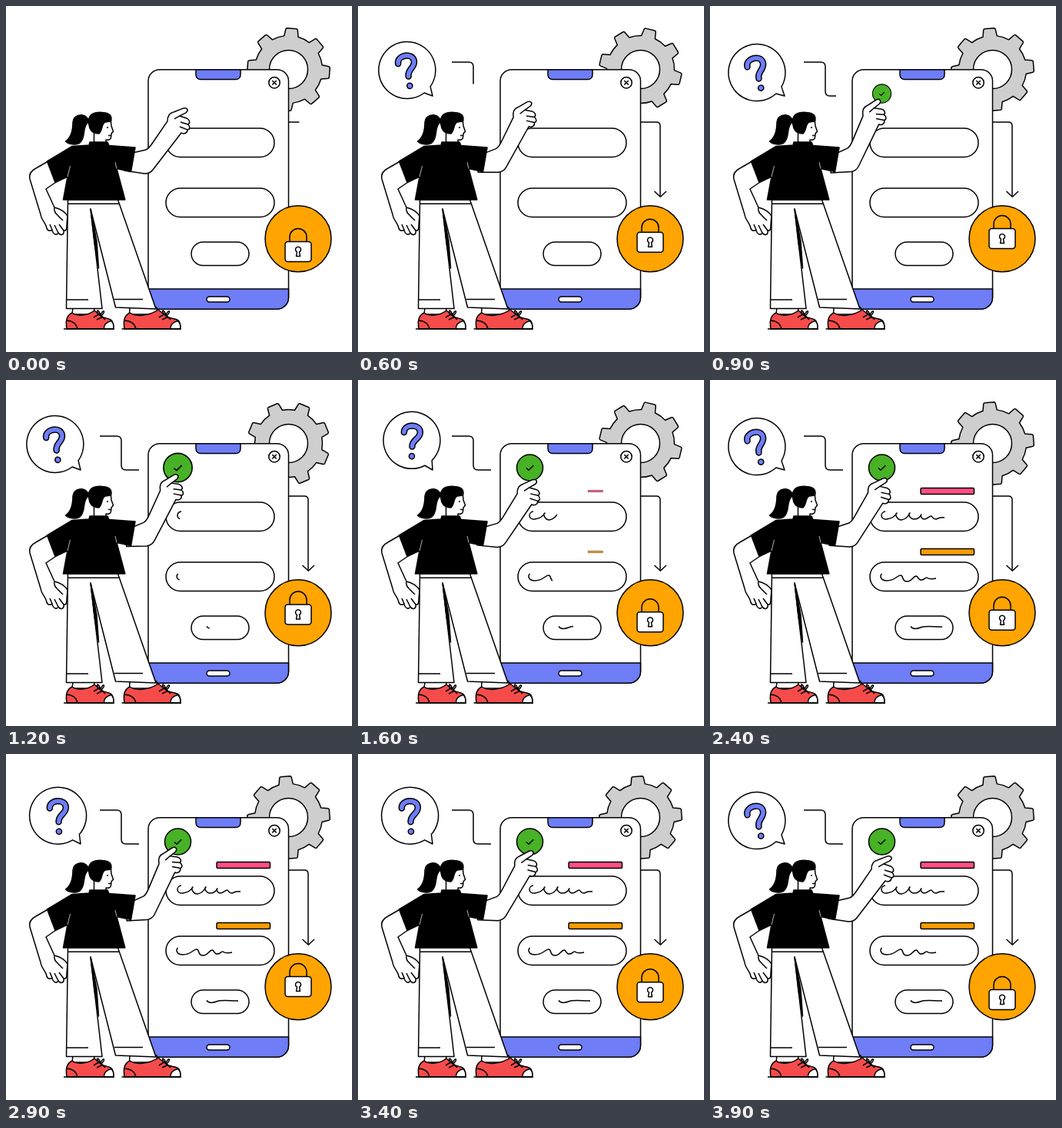
An HTML page that plays this animation: 450 px wide and 450 px high, repeating every 4000 ms.

```html
<!DOCTYPE html>
<html lang="en">
<head>
<meta charset="utf-8">
<title>Login help</title>
<style>
  html, body { margin: 0; height: 100%; overflow: hidden; background: #fff; }
  svg { display: block; width: 100vw; height: 100vh; }
  .ink { fill: none; stroke: #000; stroke-width: 1.5; stroke-linejoin: round; }
  .white { fill: #fff; }
  .blue { fill: #6f7df7; }
  .orange { fill: #ffa400; }
  .red { fill: #f64b4b; }
  .solid { fill: #000; }
</style>
</head>
<body>
<svg viewBox="0 0 450 450">
  <g class="ink">
    <path id="gear" fill="#cecece"/>
    <circle class="white" cx="367.500" cy="82.500" r="25"/>

    <path id="arrow" d="M368 151H388Q393 151 393 156V248" pathLength="1"/>
    <path id="arrowHead" d="M385.500 241L393.300 248.300L401 241"/>
    <path id="link" d="M122 73H144Q150 73 150 79V111Q150 117 156 117H173" pathLength="1"/>

    <!-- phone -->
    <rect class="white" x="185" y="82.700" width="182.500" height="311.500" rx="15"/>
    <path class="blue" d="M185 368H367.500V379.200A15 15 0 0 1 352.500 394.200H200A15 15 0 0 1 185 379.200Z"/>
    <path class="blue" d="M247 82.700H305V89Q305 95.500 298.500 95.500H253.500Q247 95.500 247 89Z"/>
    <rect class="white" x="261" y="378" width="30" height="7" rx="3.500"/>
    <circle cx="349" cy="99.700" r="7.200"/>
    <path d="M346.300 97L351.700 102.400M351.700 97L346.300 102.400"/>
    <rect class="white" x="208" y="159" width="141" height="37.500" rx="18.750"/>
    <rect class="white" x="208" y="237" width="141" height="37.500" rx="18.750"/>
    <rect class="white" x="241" y="307" width="75" height="30.500" rx="15.250"/>
    <g id="bars">
      <rect x="274" y="140.500" width="69.500" height="8" rx="1.500" fill="#ff4f82"/>
      <rect x="274" y="219.500" width="69.500" height="8" rx="1.500" fill="#f99d00"/>
    </g>
    <g id="writing">
      <path pathLength="1" d="M228 171C221 172 221 182 230 181C236 180 241 177 243 173C240 174 243 182 249 182C255 181 258 177 260 173C257 174 260 181 266 181C271 181 273 178 275 175C273 176 275 181 279 181C283 181 286 176 288 177C290 179 290 181 294 181Q300 178 305 179"/>
      <path pathLength="1" d="M223.500 252C220 256 223 261 230 261C241 261 243 254 248 254C252 254 249 262 256 262C263 262 263 256 268 255C271 255 270 260 275 260C279 260 279 257 282 257Q286 260 294 258"/>
      <path pathLength="1" d="M261 320.500C264 324.500 269 324 275 321.500C282 319.500 290 321 302 321"/>
    </g>
    <g id="check">
      <circle cx="223.500" cy="114" r="17" fill="#47b225"/>
      <path d="M218.800 114.500L222 117.300L228.300 111.200"/>
    </g>

    <!-- lock -->
    <circle class="orange" cx="380" cy="302.800" r="43"/>
    <g id="lock">
      <path d="M369 306V300.500A11 11 0 0 1 391 300.500V306"/>
      <rect class="white" x="363" y="306.500" width="34" height="26" rx="3.500"/>
      <path class="white" d="M378.500 320A3.500 3.500 0 1 1 381.500 320L382.500 325.500H377.500Z"/>
    </g>

    <!-- speech bubble, hinged at the tip of its tail -->
    <g id="bubble">
      <path class="white" d="M96.200 104.500A37 37 0 1 0 87 111.200L97 117Z"/>
      <g stroke-linecap="round">
        <path d="M60 68C60 56.500 81 56.500 81 68C81 77 70.500 77 70.500 86.500" stroke-width="8.500"/>
        <path d="M60 68C60 56.500 81 56.500 81 68C81 77 70.500 77 70.500 86.500" stroke="#6f7df7" stroke-width="5.500"/>
      </g>
      <circle class="blue" cx="70" cy="99" r="3.600"/>
    </g>

    <!-- shoes -->
    <g>
      <path class="white" d="M87 392L86 401H114L115 392Z"/>
      <path class="red" d="M86 399C92 404 106 403 115 396L123 403C128 407 137 405 139 412Q140.500 416 139.500 420H79C78 413 77 403 86 399Z"/>
      <path class="white" d="M127.500 420Q127 412 137 409.500Q141 414 139.500 420Z"/>
      <path d="M75 420H141M79 409Q91 410 93 420M114 405L122 400M118 408L126 404M121 402C116 395 120 393 123 402C126 394 131 396 124 403L129 408"/>
    </g>
    <g>
      <path class="white" d="M161 392L160.500 401H197L196 392Z"/>
      <path class="red" d="M161 399C168 404 185 404 198 395L208 403C214 408 224 405 226 412Q227.500 416 226.500 420H154C153 413 152 403 161 399Z"/>
      <path class="white" d="M214 420Q213.500 412 223.500 409.500Q228 414 226.500 420Z"/>
      <path d="M150.500 420H228M154 409Q167 410 169 420M199 405L207 400M203 408L211 404M206 402C201 395 205 393 208 402C211 394 216 396 209 403L214 408"/>
    </g>

    <!-- trousers -->
    <path class="white" d="M80.500 252H145.500L195 394L142.500 392L110 264L125 393.500H78.500Z"/>
    <path class="solid" d="M110 264L118 306L120.500 341L115 308Z"/>
    <path d="M80.500 257.300H147M78.500 382H107M141 381.500H178"/>

    <!-- resting arm -->
    <path class="white" d="M58 200L39 211Q29 216 31 225L45 271C46 279 52 282 53 289C54 293 58 293 60 291C61 297 66 299 68 295C71 299 76 298 75 292C79 293 79 289 79 285L80 273Q75 265 63 262L52 238L68 227Z"/>
    <path d="M63 262Q62 268 67 272L74 279M60 291L57 284M68 295L63 285M75 292L69 284"/>

    <g id="arm">
      <path class="white" d="M156 193L182 187C186 185 188 182 190 179L210 150C210 143 213 139 218 138L231 133C236 132 238 136 234 139L226 143L235 146C239 148 240 152 237 154C240 157 239 161 236 161C236 166 231 167 228 165L191 213C188 217 185 218 180 218L154 214Z"/>
      <path d="M226 143L219 147M237 154L227 151M236 161L226 157"/>
    </g>

    <!-- head -->
    <path class="white" d="M114.500 160V180H130V174Q136 175 136.500 171L137 166L139.500 163L137 156L136 146L120 145Z"/>
    <path class="solid" d="M107 150C108 140 116 137 126 138.500C136 139 138 144 136.500 150L129 151C124 153 126 161 121 166Q112 166 109 159Z"/>
    <path class="solid" d="M106 146C100 139 88 141 87 151C87 161 85 171 77.500 176C81 180 92 182 97 177C104 170 99 156 107 151Z"/>
    <path d="M132 157V159M133 168.500H136.500"/>

    <!-- shirt -->
    <path class="solid" d="M109 177H132L134 181.500L168 184L162.500 215.500L144 211.500L154.800 252H74.500L80 222L64 229.500L53.500 202L86 182.500L108 181Z"/>
    <path d="M80 222L83.500 208M144 211.500L142 203" stroke="#fff" style="stroke-width:.7"/>
  </g>
</svg>
<script>
const LOOP = 4000, STEP = 100;
const $ = id => document.getElementById(id);
const ramp = (t, from, to) => Math.min(1, Math.max(0, (t - from) / (to - from)));
const mix = (a, b, p) => a + (b - a) * p;
const easeOut = p => 1 - (1 - p) ** 3;
// 1 at the peak time, 0 half a period later
const swing = (t, peak, period) => (1 + Math.cos(2 * Math.PI * (t - peak) / period)) / 2;
const set = (el, transform) => el.setAttribute('transform', transform);
const scaleAt = (x, y, s) => `translate(${x} ${y}) scale(${s}) translate(${-x} ${-y})`;
const trace = (el, p) => el.setAttribute('stroke-dasharray', `${p} 2`);

const parts = {};
for (const id of ['gear', 'arrow', 'arrowHead', 'link', 'check', 'lock', 'bubble', 'arm']) parts[id] = $(id);
const bars = [...$('bars').children];
const lines = [...$('writing').children];
const GEAR = [367.5, 82.5];

function gearPath() {
  const at = (r, deg) => {
    const a = (deg - 90) * Math.PI / 180;
    return `${(GEAR[0] + r * Math.cos(a)).toFixed(2)} ${(GEAR[1] + r * Math.sin(a)).toFixed(2)}`;
  };
  let d = '';
  for (let a = 0; a < 360; a += 45) {
    d += `${a ? 'A44 44 0 0 1 ' : 'M'}${at(44, a - 12)}`;
    d += `L${at(52.5, a - 8.5)}Q${at(53.8, a - 8)} ${at(53.8, a - 6.5)}`;
    d += `L${at(53.8, a + 6.5)}Q${at(53.8, a + 8)} ${at(52.5, a + 8.5)}L${at(44, a + 12)}`;
  }
  return d + `A44 44 0 0 1 ${at(44, -12)}Z`;
}
parts.gear.setAttribute('d', gearPath());

function checkScale(t) {
  return t < 1150 ? 1.12 * easeOut(ramp(t, 800, 1150)) : mix(1.12, 1, ramp(t, 1150, 1400));
}

function render(t) {
  set(parts.gear, `rotate(${4.5 + t * 0.09} ${GEAR})`);

  trace(parts.arrow, ramp(t, -67, 533));
  parts.arrowHead.style.display = t >= 500 ? '' : 'none';
  trace(parts.link, ramp(t, 0, 1000));

  const tilt = -15 * (1 - swing(t, 150, 1500));
  set(parts.bubble, `rotate(${tilt} 97 117) ` + scaleAt(97, 117, easeOut(ramp(t, 0, 500))));

  const down = swing(t, -50, 2000);
  set(parts.lock, `translate(0 ${17 * (down - 1)})`);
  set(parts.arm, `rotate(${-11.8 * (1 - down)} 170 200)`);

  set(parts.check, scaleAt(223.5, 114, checkScale(t)));
  const grow = ramp(t, 1400, 2120);
  bars.forEach((bar, i) => set(bar, scaleAt(308.75, 144.5 + 79 * i, grow)));
  lines.forEach(line => trace(line, ramp(t, 1080, 2165)));
}

function tick() {
  const t = performance.now() % LOOP;
  render(Math.floor(t / STEP) * STEP);
  requestAnimationFrame(tick);
}
render(0);
requestAnimationFrame(tick);
</script>
</body>
</html>
```
